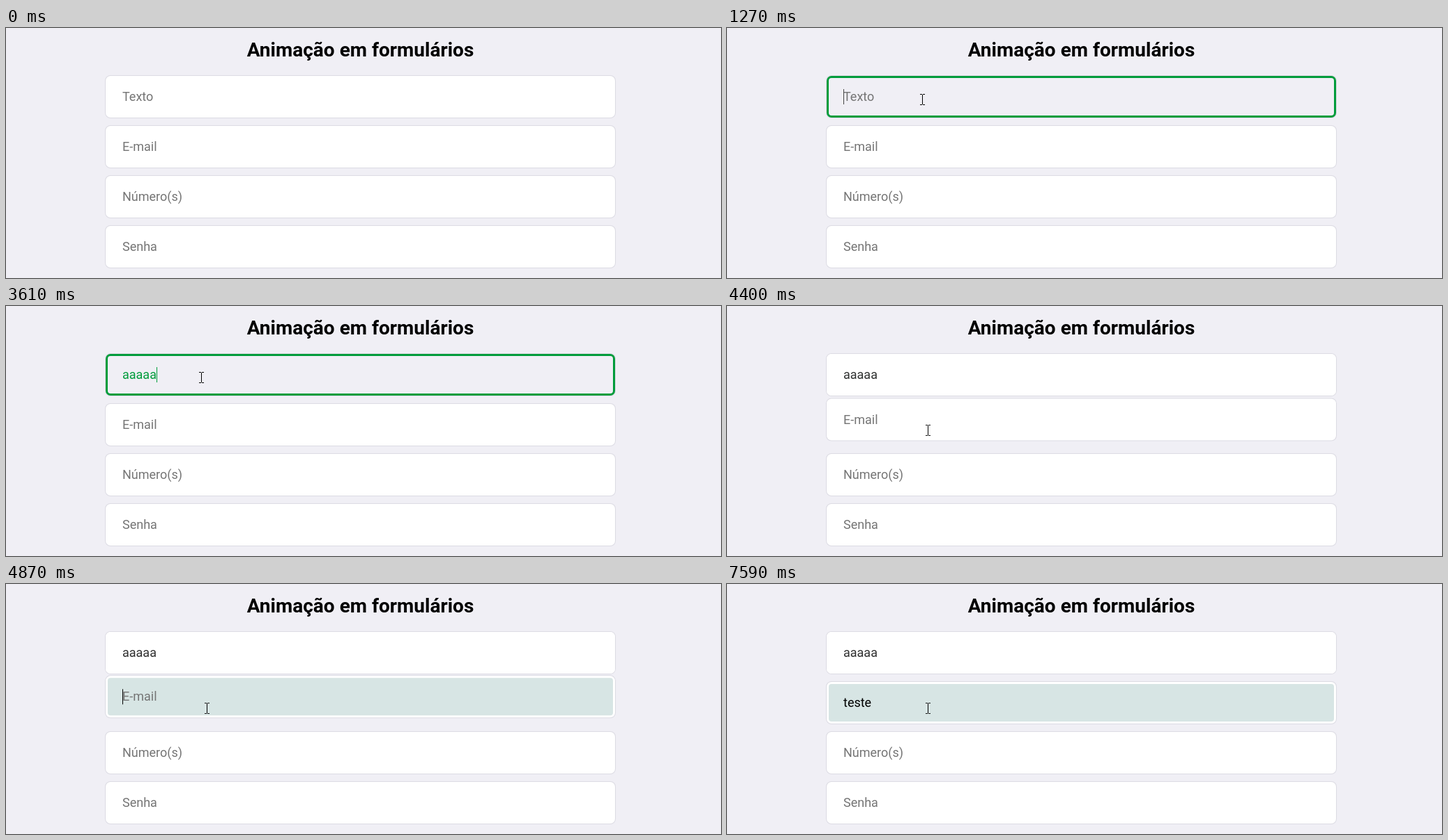
Write an HTML page with a canvas that moves like this. It is 1026 px wide and 360 px high and loops after 8 s.

```html
<!DOCTYPE html>
<html lang="pt">
<head>
<meta charset="utf-8">
<title>Animação em formulários</title>
<style>
html, body { margin: 0; width: 100%; height: 100%; overflow: hidden; background: #f0eff5; }
canvas { display: block; }
</style>
</head>
<body>
<canvas id="stage" width="1026" height="360"></canvas>
<script>
const ctx = document.getElementById('stage').getContext('2d');
const LOOP = 8000;
const PAGE = [240, 239, 245], WHITE = [255, 255, 255], TEAL = [215, 229, 228];
const GREEN = [0, 156, 59], INK = [48, 48, 48];
const FONT = 'Roboto, Arial, sans-serif';
const LEFT = 142, WIDTH = 733, HEIGHT = 62, TOPS = [68, 140, 212, 284];

// Stretches of motion: start, end, number of steps
const SPANS = [[230, 1030, 11], [1120, 1270, 3], [3990, 4780, 11], [4870, 5190, 5]];
const KEYS_A = [2280, 2910, 3140, 3290, 3610];
const KEYS_B = [6350, 6520, 6730, 6890, 7040];

const clamp = v => Math.max(0, Math.min(1, v));
const mix = (a, b, p) => a + (b - a) * p;
const blend = (a, b, p) => a.map((v, i) => Math.round(mix(v, b[i], p)));
const rgb = c => `rgb(${c.join(',')})`;
const within = (t, a, b) => t >= a && t < b;

function snap(t) {
  for (const [a, b, n] of SPANS) {
    if (!within(t, a, b + 90)) continue;
    const dt = (b - a) / (n - 1);
    return Math.min(b, a + Math.floor((t - a) / dt + 1e-6) * dt);
  }
  return t;
}

// cubic-bezier(.25, .1, .25, 1)
function ease(x) {
  const bez = (s, p, q) => 3 * s * (1 - s) * (1 - s) * p + 3 * s * s * (1 - s) * q + s * s * s;
  let lo = 0, hi = 1;
  for (let i = 0; i < 20; i++) {
    const s = (lo + hi) / 2;
    if (bez(s, 0.25, 0.25) < x) lo = s; else hi = s;
  }
  return bez(lo, 0.1, 1);
}

const fade = (t, start, dur) => ease(clamp((t - start) / dur));
const smooth = (t, a, b) => {
  const u = clamp((t - a) / (b - a));
  return u * u * (3 - 2 * u);
};

function box(x, y, w, h, r, color) {
  ctx.fillStyle = color;
  ctx.beginPath();
  ctx.roundRect(x, y, w, h, r);
  ctx.fill();
}

function field(top, { fill = WHITE, ring = 0, ringColor = WHITE, hint, value = '', color = '#000', caret = null }) {
  box(LEFT, top, WIDTH, HEIGHT, 8, '#dcdbe3');
  box(LEFT + 1, top + 1, WIDTH - 2, HEIGHT - 2, 7, rgb(ring ? ringColor : fill));
  if (ring) {
    const d = 1 + ring;
    box(LEFT + d, top + d, WIDTH - 2 * d, HEIGHT - 2 * d, 8 - d, rgb(fill));
  }
  ctx.font = `18px ${FONT}`;
  ctx.textAlign = 'left';
  ctx.fillStyle = value ? color : '#757575';
  ctx.fillText(value || hint, LEFT + 25, top + 37);
  if (caret) {
    ctx.fillStyle = caret;
    ctx.fillRect(Math.round(LEFT + 25 + ctx.measureText(value).width), top + 20, 1, 22);
  }
}

const typed = (word, keys, t) => word.slice(0, keys.filter(k => t >= k).length);

function pointer(t) {
  const a = smooth(t, 190, 830), b = smooth(t, 3930, 4350);
  return [
    Math.round(mix(0, 280, a) + 8 * b),
    Math.round(mix(324, 103, a) + 76 * b)
  ];
}

function beam(x, y) {
  ctx.fillStyle = '#000';
  for (const dy of [-8, 7]) {
    ctx.fillRect(x - 3, y + dy, 3, 1);
    ctx.fillRect(x + 1, y + dy, 3, 1);
  }
  ctx.fillRect(x, y - 7, 1, 14);
}

function arrow(x, y) {
  const pts = [[0, 0], [0, 16], [4, 12.5], [6.5, 18], [9, 17], [6.5, 11.5], [11.5, 11.5]];
  ctx.beginPath();
  pts.forEach(([px, py]) => ctx.lineTo(x + px + 0.5, y + py + 0.5));
  ctx.closePath();
  ctx.fillStyle = '#fff';
  ctx.fill();
  ctx.strokeStyle = '#000';
  ctx.lineWidth = 1;
  ctx.stroke();
}

function drawPointer(t) {
  if (t < 230) return;
  const [x, y] = pointer(t);
  const over = x >= LEFT && x < LEFT + WIDTH && TOPS.some(top => within(y, top, top + HEIGHT));
  (over ? beam : arrow)(x, y);
}

function draw(now) {
  const t = snap(now);
  ctx.fillStyle = rgb(PAGE);
  ctx.fillRect(0, 0, 1026, 360);

  ctx.fillStyle = '#000';
  ctx.font = `bold 28px ${FONT}`;
  ctx.textAlign = 'center';
  ctx.fillText('Animação em formulários', 508.5, 41);

  const leave = fade(t, 4130, 300);
  const hover = fade(t, 700, 300) * (1 - leave);
  const focus = fade(t, 1060, 210) * (1 - leave);
  const caretA = within(t, 1120, 1670) ? '#444'
    : within(t, 2130, 2830) || within(t, 2910, 4070) ? rgb(GREEN) : null;
  field(TOPS[0], {
    hint: 'Texto',
    value: typed('aaaaa', KEYS_A, t),
    fill: blend(WHITE, PAGE, focus),
    ring: 3 * hover,
    ringColor: blend(WHITE, GREEN, hover),
    color: rgb(blend(GREEN, INK, leave)),
    caret: caretA
  });

  const lift = 10 * (fade(t, 4250, 300) - fade(t, 4830, 320));
  const active = fade(t, 4540, 240);
  const caretB = within(t, 4620, 5110) || within(t, 5580, 6120) || within(t, 6350, 7590);
  field(TOPS[1] - lift, {
    hint: 'E-mail',
    value: typed('teste', KEYS_B, t),
    fill: blend(WHITE, TEAL, active),
    ring: 3 * active,
    caret: caretB ? '#000' : null
  });

  field(TOPS[2], { hint: 'Número(s)' });
  field(TOPS[3], { hint: 'Senha' });
  drawPointer(t);
}

function tick() {
  draw(performance.now() % LOOP);
  requestAnimationFrame(tick);
}
tick();
</script>
</body>
</html>
```
